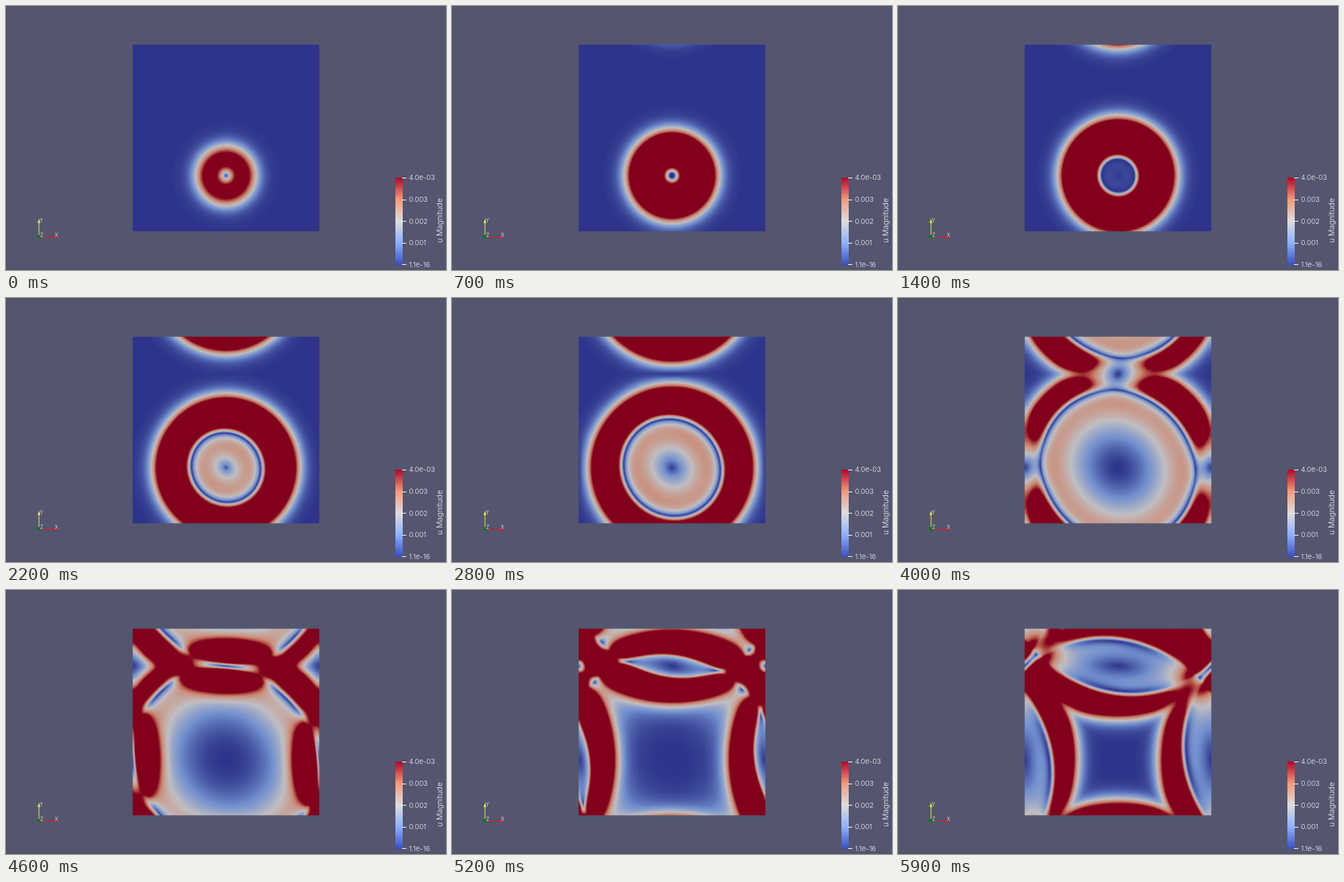
An HTML page with a canvas for the animation above (6000 ms loop, 600x360 px).

```html
<!DOCTYPE html>
<html lang="en">
<head>
<meta charset="utf-8">
<title>Wave magnitude</title>
<style>
  html, body { margin: 0; width: 100%; height: 100%; overflow: hidden; background: #53566e; }
  #stage { position: relative; width: 600px; height: 360px; overflow: hidden; }
  canvas { position: absolute; left: 173px; top: 53px; transform: scale(1.004); }
  svg { position: absolute; left: 0; top: 0; }
  text { font-family: Inter, "Liberation Sans", sans-serif; font-weight: 300; fill: #f4f4f8; }
</style>
</head>
<body>
<div id="stage">
  <canvas id="field" width="254" height="254"></canvas>
  <svg width="600" height="360" viewBox="0 0 600 360">
    <defs>
      <linearGradient id="bar" x1="0" y1="0" x2="0" y2="1">
        <stop offset="0" stop-color="#b40426"/>
        <stop offset=".25" stop-color="#f49a7b"/>
        <stop offset=".5" stop-color="#dddddd"/>
        <stop offset=".75" stop-color="#8db0fe"/>
        <stop offset="1" stop-color="#3b4cc0"/>
      </linearGradient>
    </defs>
    <rect x="531" y="234" width="10" height="119" fill="url(#bar)"/>
    <path d="M540 234.5h6M540 264.5h6M540 293.5h6M540 323.5h6M540 352.5h6" stroke="#f4f4f8"/>
    <g font-size="9.5">
      <text x="549.5" y="237">4.0e-03</text>
      <text x="549.5" y="267">0.003</text>
      <text x="549.5" y="297">0.002</text>
      <text x="549.5" y="326">0.001</text>
      <text x="549.5" y="356">1.1e-16</text>
    </g>
    <text font-size="10.5" text-anchor="middle" transform="translate(595 292.5) rotate(-90)">u Magnitude</text>
    <path d="M45 314V295" stroke="#e6e632"/>
    <path d="M45 290l2 6h-4z" fill="#e6e632"/>
    <path d="M45 315H66" stroke="#d81e28"/>
    <path d="M71 315l-6 2.2v-4.4z" fill="#d81e28"/>
    <circle cx="45" cy="314.5" r="2.6" fill="#0a7a1c"/>
    <g font-size="7">
      <text x="46" y="295">Y</text>
      <text x="66.5" y="315">X</text>
      <text x="46.5" y="315">Z</text>
    </g>
  </svg>
</div>
<script>
const SIZE = 254, STEP = 100, COUNT = 60;
const CX = 127, CY = 178;      // wave centre inside the periodic square
const MAX = 0.004;
const ctx = document.getElementById('field').getContext('2d');

const stops = [
  [0, 46, 52, 138], [0.25, 113, 143, 206], [0.5, 192, 191, 194],
  [0.75, 203, 136, 114], [0.9, 170, 66, 60], [1, 130, 0, 28]
];

function colorAt(v) {
  let i = 1;
  while (i < stops.length - 1 && v > stops[i][0]) i++;
  const a = stops[i - 1], b = stops[i], m = (v - a[0]) / (b[0] - a[0]);
  return [1, 2, 3].map(c => Math.round(a[c] + (b[c] - a[c]) * m));
}
const palette = Array.from({ length: 256 }, (_, i) => colorAt(i / 255));

const ramp = (a, b, x) => {
  const u = Math.min(1, Math.max(0, (x - a) / (b - a)));
  return u * u * (3 - 2 * u);
};

// Signed radial displacement: a pulse outside the zero ring, a weak wake inside it
function makeProfile(k) {
  const x = k - 22;
  const front = 94 + 2.4 * x + 0.008 * x * x - 8 * Math.exp(-k / 4);
  const zero = 4 * Math.log(1 + Math.exp((47 + 3.1 * x) / 4));
  const pulse = 0.006 + 0.0025 * Math.min(1, k / 10);
  const wake = 0.0043 * ramp(12, 22, k) * (1 - 0.25 * ramp(40, 56, k));
  const power = Math.max(0.6, 0.6 + 0.03 * x + 0.0013 * x * x);
  const skew = 0.002 * k;      // the zero ring lags along one diagonal
  const reach = front + 36;
  const value = (r, s) => {
    const z = zero / Math.sqrt(1 - skew * s);
    if (r >= z) {
      return pulse * (1 - Math.exp((z - r) / 11)) / (1 + Math.exp((r - front) / 6.5));
    }
    return -wake * (1 - skew * s) * Math.pow(r / zero, power) * (1 - Math.exp((r - z) / 10));
  };
  return { reach, value };
}

function render(k) {
  const { reach, value } = makeProfile(k);
  const img = ctx.createImageData(SIZE, SIZE), px = img.data;
  let p = 0;
  for (let j = 0; j < SIZE; j++) {
    for (let i = 0; i < SIZE; i++) {
      let ux = 0, uy = 0;
      for (let n = -1; n <= 1; n++) {
        const dy = j + 0.5 - CY - n * SIZE;
        if (Math.abs(dy) > reach) continue;
        for (let m = -1; m <= 1; m++) {
          const dx = i + 0.5 - CX - m * SIZE;
          const r2 = dx * dx + dy * dy;
          if (r2 > reach * reach) continue;
          const r = Math.sqrt(r2);
          const f = value(r, 2 * dx * dy / r2) / r;
          ux += f * dx;
          uy += f * dy;
        }
      }
      const level = Math.min(1, Math.sqrt(ux * ux + uy * uy) / MAX);
      const c = palette[Math.round(level * 255)];
      px[p++] = c[0];
      px[p++] = c[1];
      px[p++] = c[2];
      px[p++] = 255;
    }
  }
  return img;
}

const cache = [];
const start = performance.now();
let shown = -1;

function tick() {
  const k = Math.floor((performance.now() - start) / STEP) % COUNT;
  if (k !== shown) {
    cache[k] = cache[k] || render(k);
    ctx.putImageData(cache[k], 0, 0);
    shown = k;
  }
  requestAnimationFrame(tick);
}
tick();
</script>
</body>
</html>
```
